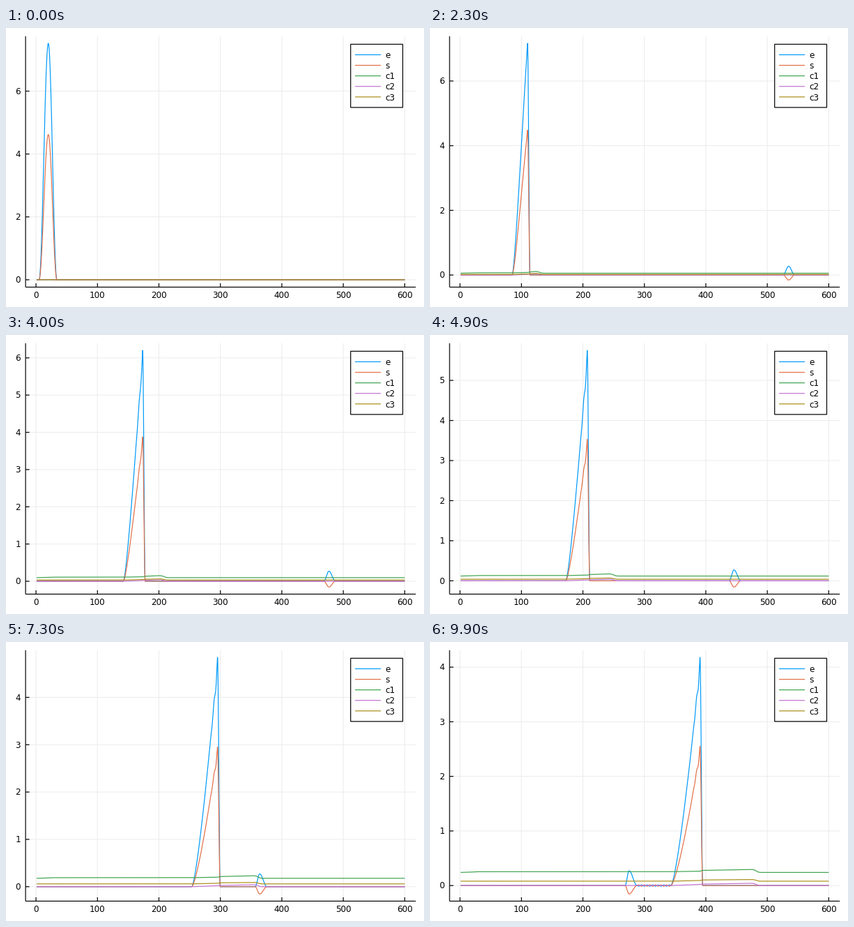
Recreate the animation shown at these times as a matplotlib script. Size 600 by 400 pixels, loop 10000 ms.

```python
import numpy as np
import matplotlib.pyplot as plt
from matplotlib.animation import FuncAnimation
from matplotlib.patches import Rectangle

W, H, DPI = 600, 400, 100
FRAMES, INTERVAL = 100, 100
LEFT, RIGHT, TOP, BOTTOM = 28.1, 588.2, 11.8, 371.5
PX = 72 / DPI
NAMES = ["e", "s", "c1", "c2", "c3"]
COLORS = ["#009afa", "#e36f47", "#3ea44e", "#c371d2", "#ac8e18"]

plt.rcParams["font.family"] = "DejaVu Sans"
x = np.linspace(1, 600, 599 * 4 + 1)

# Keyframes of the main pulse: trailing edge, crest and crest heights
KEYS = [0, 14, 31, 49, 61, 84, 99]
START = [5, 54, 112, 172, 212, 291, 343]
CREST = [20, 76, 140, 207, 251, 336, 390.5]
S_HEIGHT = [4.62, 4.79, 4.22, 3.53, 3.19, 2.75, 2.55]
E_KEYS = [0, 14, 31, 44, 49, 61, 72, 84, 99]
E_HEIGHT = [7.52, 7.63, 6.78, 5.945, 5.75, 5.22, 4.89, 4.55, 4.18]


def pulse(n, start, crest, height):
    """Unit-height bump whose back stretches while its front steepens."""
    q = np.interp(n, [0, 14], [1, 0.978]) if n < 14 else height / 7.8
    f = np.linspace(0, 1, 400)
    back = 15 - 30 / np.pi * np.arccos(np.sqrt(f * q))
    back += (crest - start - back[-1]) * f
    d = x - crest
    y = np.interp(x - start, back, f) ** np.interp(n, [14, 84], [1, 1.25])
    ring = np.interp(n, [14, 49], [0, 0.04])
    tail = np.exp(np.minimum(d, 0) / 5) * np.cos(2 * np.pi * d / 6)
    y = y * (1 - ring) + ring * tail
    width = np.interp(n, [0, 6, 14, 99], [14, 9, 4, 4.4])
    front = 0.5 * (1 + np.cos(np.pi * np.clip(d / width, 0, 1)))
    return np.where(d <= 0, y, front)


def echo(n):
    """Small pulse running left on a periodic domain."""
    center = 613.2 - 3.415 * n
    d = (x - center + 300) % 600 - 300
    half = np.where(d < 0, np.interp(n, [14, 99], [9, 6.5]),
                    np.interp(n, [14, 99], [9.5, 13]))
    shape = np.cos(np.pi / 2 * np.clip(d / half, -1, 1)) ** 2
    return center, shape * min(1, n / 4)


def steps(points):
    px, py = np.array(points, dtype=float).T
    return np.interp(x, np.maximum.accumulate(px), py)


def curves(n):
    start = np.interp(n, KEYS, START)
    crest = np.interp(n, KEYS, CREST)
    he = np.interp(n, E_KEYS, E_HEIGHT)
    hs = np.interp(n, KEYS, S_HEIGHT)
    main = pulse(n, start, crest, he)
    center, small = echo(n)
    e = he * main + 0.27 * small
    s = hs * main - 0.155 * small
    if n > 86:
        ripple = 0.012 * np.sin(2 * np.pi * (x - center) / 9)
        ripple *= (x > center + 13) & (x < start)
        e, s = e + ripple, s - ripple

    lead = 29 + 4.64 * n
    grow = np.interp(n, [0, 8], [0.3, 1])

    def trail(head, foot, behind, ahead, top):
        return grow * steps(head + [
            (start, foot), (crest, behind), (crest + 4, ahead),
            (lead - 13, top), (lead - 9, top * 0.8),
            (lead - 3, top * 0.1), (lead, 0)])

    c1 = 0.00243 * n + trail([(1, 0), (12, 0.003), (28, 0.013)],
                             0.013, 0.022, 0.037, 0.055)
    c2 = trail([(1, 0)], 0, 0.02, 0.027, 0.042)
    c3 = 0.00081 * n + trail([(1, 0)], 0, 0.012, 0.022, 0.031)
    return [e, s, c1, c2, c3]


def to_px(v):
    return LEFT + (v + 16.97) * (RIGHT - LEFT) / 634.94


fig = plt.figure(figsize=(W / DPI, H / DPI), dpi=DPI, facecolor="white")
ax = fig.add_axes([0, 0, 1, 1])
ax.set(xlim=(0, W), ylim=(H, 0))
ax.axis("off")


def line(xs, ys, color="black", width=1.2, z=2):
    return ax.plot(xs, ys, color=color, lw=width * PX, zorder=z,
                   snap=False, solid_capstyle="butt")[0]


def label(px, py, text, ha):
    return ax.text(px, py + 4.3, text, fontsize=12 * PX, ha=ha,
                   va="baseline", zorder=6)


GRID = dict(color="#ececec", width=1, z=1)
for v in range(0, 601, 100):
    p = to_px(v)
    line([p, p], [TOP, BOTTOM], **GRID)
    line([p, p], [BOTTOM, BOTTOM - 5.5])
    label(p, 382.6, str(v), "center")
line([LEFT, RIGHT], [BOTTOM, BOTTOM])
line([LEFT, LEFT], [TOP, BOTTOM])

ticks = [(line([LEFT, RIGHT], [0, 0], **GRID),
          line([LEFT, LEFT + 5.5], [0, 0]),
          label(20.8, 0, "", "right")) for _ in range(8)]
plots = [line(to_px(x), x * 0, c, z=3) for c in COLORS]

ROW = 15.1
BOX_X, BOX_Y = 494.7, 23.3
ax.add_patch(Rectangle((BOX_X, BOX_Y), 74.8, 6 * ROW, fc="white", ec="black",
                       lw=1.2 * PX, zorder=4, snap=False))
for i, (name, color) in enumerate(zip(NAMES, COLORS)):
    row = BOX_Y + ROW * (i + 1)
    line([501, 538], [row, row], color, z=5)
    label(544, row + 0.5, name, "left")


def draw(n):
    data = curves(n)
    lo = min(-0.008, min(d.min() for d in data))
    hi = max(d.max() for d in data)
    pad = 0.03 * (hi - lo)
    lo, hi = lo - pad, hi + pad

    def y_px(v):
        return BOTTOM - (v - lo) * (BOTTOM - TOP) / (hi - lo)

    for p, d in zip(plots, data):
        p.set_ydata(y_px(d))
    step = 2 if hi >= 7 else 1
    for i, (grid, mark, text) in enumerate(ticks):
        v = i * step
        y = y_px(v)
        for part in (grid, mark, text):
            part.set_visible(v <= hi)
        grid.set_ydata([y, y])
        mark.set_ydata([y, y])
        text.set_y(y + 4.3)
        text.set_text(str(v))
    return plots


anim = FuncAnimation(fig, draw, frames=FRAMES, interval=INTERVAL,
                     repeat=True, repeat_delay=0, blit=False)
plt.show()
```
